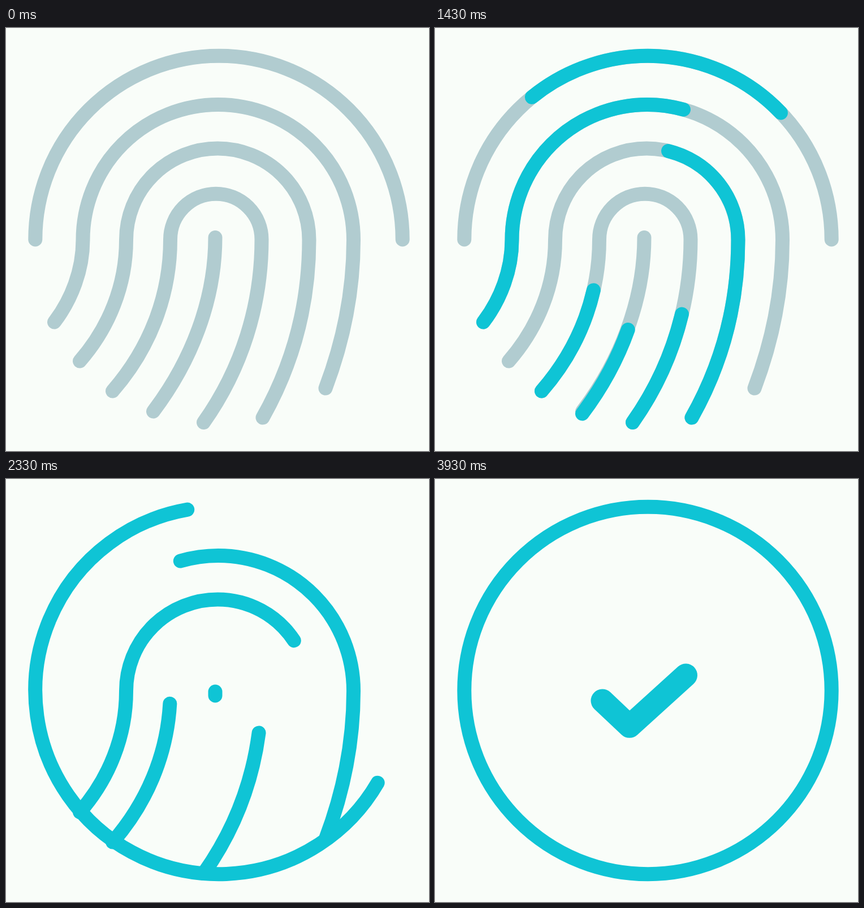
These frames come from a looping animation (748x748 px, 3960 ms). An HTML page:

```html
<!DOCTYPE html>
<html lang="en">
<head>
<meta charset="utf-8">
<title>Fingerprint check</title>
<style>
  html, body { margin: 0; width: 100%; height: 100%; overflow: hidden; background: #f9fdf9; }
  svg { display: block; width: 100vw; height: 100vh; }
  path { fill: none; stroke-width: 25; stroke-linecap: round; stroke-linejoin: round; }
  #base path { stroke: #b1ccd0; }
  #ink path { stroke: #0fc4d5; }
</style>
</head>
<body>
<svg viewBox="0 0 748 748"><g id="base"></g><g id="ink"></g></svg>
<script>
const LOOP = 3960, START = 500, FILLED = 2100, DOT = 2330;
const CENTER = [376.5, 374], RADIUS = 324.7;

const ridges = {
  wide: 'M85.5 520C116 480 136 428 136 374.7A239.25 239.25 0 0 1 614.5 374.7C614.5 465 596 555 565 637',
  middle: 'M130.5 589C182 530 212.5 455 212.5 374.7A161.75 161.75 0 0 1 536 374.7C536 488 508 593 454 689',
  inner: 'M188.5 642C253 568 290.5 475 290.5 374A80.75 80.75 0 0 1 452 374C452 490 417 602 349.5 697.5',
};
const coreBase = 'M370 370.5C370 482 327 590 260.5 678';
const coreInk = 'M370 371C370 483 329 591 260.5 682';
const dot = [[370, 376], [370, 380], [370, 383]];
const check = [[296, 392], [344, 437.3], [443.5, 347]];

const clamp = x => Math.min(1, Math.max(0, x));
const mix = (a, b, k) => a + (b - a) * k;
const smooth = (t, from, to) => {
  const u = clamp((t - from) / (to - from));
  return u * u * (3 - 2 * u);
};

// Smooth curve through values at the key times, at rest at both ends.
const times = [START, 730, 1430, 1900, FILLED];
function track(t, values) {
  const last = times.length - 1;
  if (t <= START) return values[0];
  if (t >= FILLED) return values[last];
  const i = times.findIndex((x, n) => n < last && t < times[n + 1]);
  const slope = n => n === 0 || n === last ? 0
    : (values[n + 1] - values[n - 1]) / (times[n + 1] - times[n - 1]);
  const h = times[i + 1] - times[i], u = (t - times[i]) / h, v = 1 - u;
  return v * v * (1 + 2 * u) * values[i] + u * u * (1 + 2 * v) * values[i + 1]
    + h * u * v * (v * slope(i) - u * slope(i + 1));
}

function addPath(layer, d = '') {
  const path = document.createElementNS('http://www.w3.org/2000/svg', 'path');
  path.setAttribute('d', d);
  path.setAttribute('pathLength', 1);
  return document.getElementById(layer).appendChild(path);
}

function show(path, visible) {
  path.style.display = visible ? '' : 'none';
}

function trim(path, from, to) {
  const length = to - from;
  show(path, length > 0.0005);
  path.style.strokeDasharray = `${length} 3`;
  path.style.strokeDashoffset = -from;
}

// Angles in degrees, clockwise from the top.
function arc(from, to) {
  const point = deg => {
    const a = deg * Math.PI / 180;
    return `${CENTER[0] + RADIUS * Math.sin(a)} ${CENTER[1] - RADIUS * Math.cos(a)}`;
  };
  const step = deg => `A${RADIUS} ${RADIUS} 0 0 1 ${point(deg)}`;
  return `M${point(from)}${step((from + to) / 2)}${step(to)}`;
}

[arc(-90, 90), ...Object.values(ridges), coreBase].forEach(d => addPath('base', d));
const base = document.getElementById('base');
const wide = addPath('ink', ridges.wide);
const middle = addPath('ink', ridges.middle);
const innerLeft = addPath('ink', ridges.inner);
const innerRight = addPath('ink', ridges.inner);
const core = addPath('ink', coreInk);
const ring = addPath('ink');
const mark = addPath('ink');

function draw(t) {
  const fill = track(t, [0, 0.038, 0.507, 0.894, 1]);
  const erase = smooth(t, FILLED, 2638);
  const spin = smooth(t, FILLED, 2766);
  show(base, t < FILLED);

  trim(wide, erase, fill);
  trim(middle, 1 - fill, 1 - erase);
  trim(innerLeft, 0, track(t, [0, 0.012, 0.227, 0.439, 0.5]) * (1 - erase));
  trim(innerRight, 1 - track(t, [0, 0.0275, 0.237, 0.443, 0.5]) * (1 - erase), 1);

  const coreFill = track(t, [0, 0.04, 0.505, 0.88, 1]);
  const shrink = smooth(t, FILLED, DOT);
  trim(core, mix(1 - coreFill, 0.017, shrink), t < DOT ? mix(1, 0.037, shrink) : 0);

  // The arc turns once backwards while growing into a full circle.
  const left = track(t, [3, -1, -39.1, -79, -90]) - 540 * spin;
  const right = track(t, [3, 6.7, 46.3, 80.6, 90]) - 360 * spin;
  show(ring, t > START);
  ring.setAttribute('d', arc(left, right));

  const grow = smooth(t, DOT, 2800);
  const points = dot.map((p, i) => p.map((v, axis) => mix(v, check[i][axis], grow)));
  show(mark, t >= DOT);
  mark.setAttribute('d', 'M' + points.map(p => p.join(' ')).join('L'));
  mark.style.strokeWidth = mix(25, 41, grow);
}

const began = performance.now();
function tick() {
  draw((performance.now() - began) % LOOP);
  requestAnimationFrame(tick);
}
tick();
</script>
</body>
</html>
```
